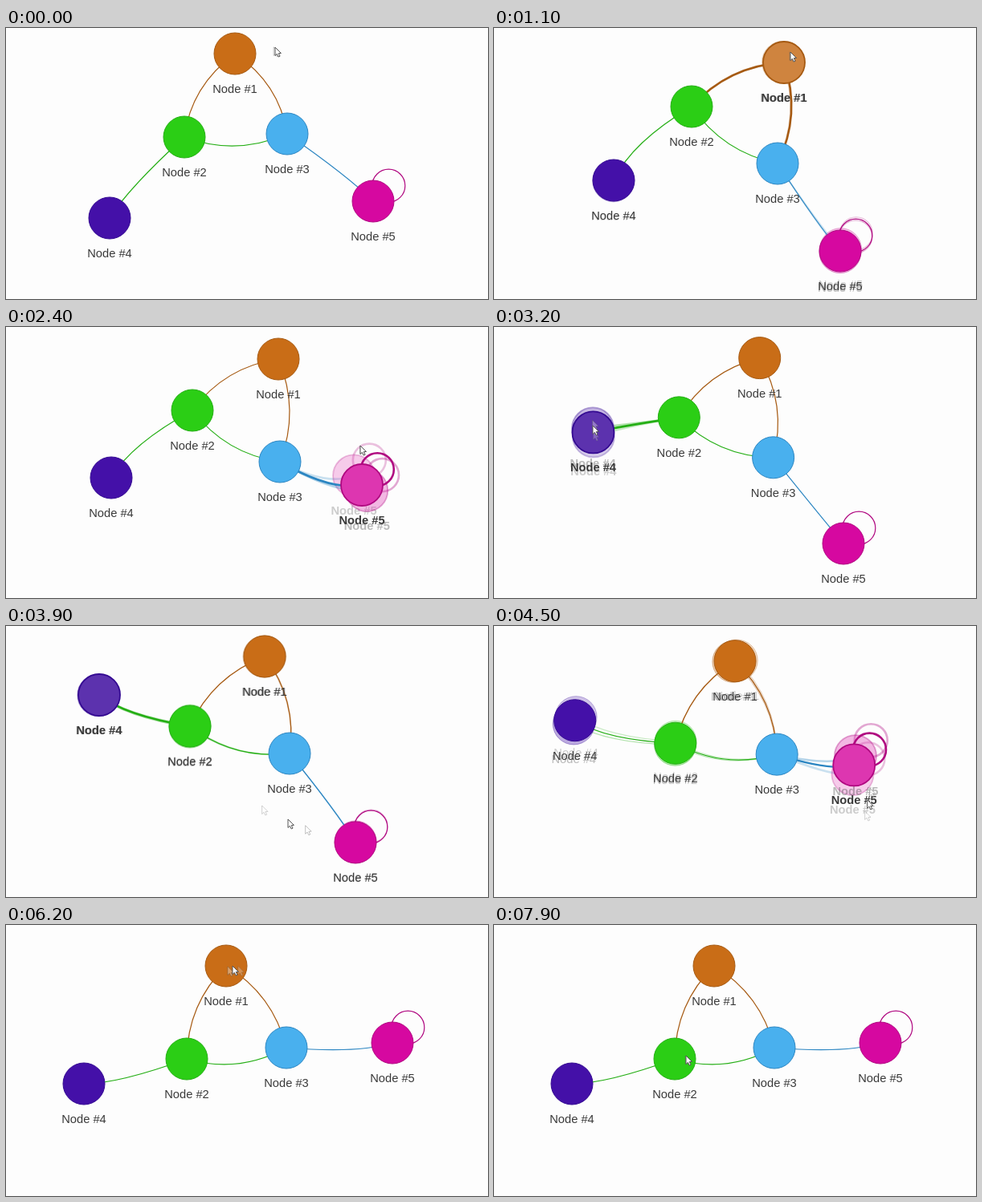
An HTML page with a canvas for the animation above (8000 ms loop, 600x338 px).

```html
<!DOCTYPE html>
<html lang="en">
<head>
<meta charset="utf-8">
<title>Elastic node graph</title>
<style>
  html, body { margin: 0; width: 100%; height: 100%; overflow: hidden; background: #fdfdfd; }
  canvas { display: block; }
</style>
</head>
<body>
<canvas id="stage" width="600" height="338"></canvas>
<script>
const ctx = document.getElementById('stage').getContext('2d');
const LOOP = 8000, STEP = 100, BLUR = 50;
const RADIUS = 26, BOW = 26;

// Each node glides through these poses: start, after each drag, and at rest
const poseTimes = [400, 1100, 2400, 3900, 5000, 5900];
const timed = poses => poses.map((p, i) => [poseTimes[i], ...p]);

const nodes = [
  { fill: '#c96d17', lit: '#cf843f', rim: '#a65a12',
    path: timed([[285, 32], [361, 43], [339, 40], [322, 38], [283, 49], [274, 51]]) },
  { fill: '#2bce15', lit: '#55d844', rim: '#24ae14',
    path: timed([[222, 136], [246, 98], [232, 104], [229, 125], [224, 161], [225, 167]]) },
  { fill: '#49b0ee', lit: '#6dc0f1', rim: '#2c86c2',
    path: timed([[350, 132], [353, 169], [341, 168], [353, 159], [351, 161], [349, 153]]) },
  { fill: '#4410a8', lit: '#5c32ae', rim: '#340a92',
    path: timed([[129, 237], [149, 190], [131, 188], [116, 86], [92, 156], [97, 198]]) },
  { fill: '#d608a0', lit: '#dd36b0', rim: '#b00880',
    path: timed([[457, 216], [431, 278], [443, 197], [435, 270], [464, 100], [481, 147]]) }
];
// The last node is also shaken up and down around its first drag
nodes[4].path.push([1700, 430, 291], [1850, 453, 285], [2250, 415, 165], [2600, 461, 220], [3200, 435, 270]);
nodes[4].path.sort((a, b) => a[0] - b[0]);

const cursorPath = [[0, 335, 24], [400, 293, 20], [1100, 369, 30], [1300, 369, 30], [1700, 436, 283],
  [2250, 441, 148], [2450, 441, 148], [2700, 131, 172], [3600, 121, 88], [3900, 351, 241],
  [4200, 444, 270], [5000, 480, 102], [5200, 480, 102], [6200, 282, 51], [7200, 196, 164], [7900, 239, 163]];

const edges = [[0, 1], [0, 2], [1, 2], [1, 3], [2, 4]];

// [start, selected node]
const selections = [[0, -1], [400, 0], [1700, 4], [2700, 3], [4200, 4], [5700, -1]];
const selectedAt = t => selections.filter(s => s[0] <= t).pop()[1];

// Monotone cubic interpolation of column k
function sample(path, t, k) {
  const last = path.length - 1;
  if (t <= path[0][0]) return path[0][k];
  if (t >= path[last][0]) return path[last][k];
  const i = path.findIndex(p => p[0] > t) - 1;
  const rate = j => (path[j + 1][k] - path[j][k]) / (path[j + 1][0] - path[j][0]);
  const slope = j => {
    if (j === 0 || j === last) return 0;
    const a = rate(j - 1), b = rate(j);
    return a * b <= 0 ? 0 : 2 * a * b / (a + b);
  };
  const h = path[i + 1][0] - path[i][0], u = (t - path[i][0]) / h, v = 1 - u;
  return path[i][k] * v * v * (1 + 2 * u) + path[i + 1][k] * u * u * (1 + 2 * v)
    + h * u * v * (slope(i) * v - slope(i + 1) * u);
}
const place = (path, t) => ({ x: sample(path, t, 1), y: sample(path, t, 2) });
const middle = (...ps) => ({
  x: ps.reduce((sum, p) => sum + p.x, 0) / ps.length,
  y: ps.reduce((sum, p) => sum + p.y, 0) / ps.length
});

function strokeLine(color, lit) {
  ctx.lineWidth = lit ? 2.6 : 1.2;
  ctx.strokeStyle = color;
  ctx.stroke();
}

// Edges bow away from the centre of the triangle; the tails follow their inner node
function drawEdge([from, to], spots, lit) {
  const a = spots[from], b = spots[to];
  const mid = middle(a, b), core = middle(...spots.slice(0, 3));
  const pushed = to > 2 ? a : mid;
  const dx = pushed.x - core.x, dy = pushed.y - core.y;
  const k = BOW / Math.hypot(dx, dy);
  ctx.beginPath();
  ctx.moveTo(a.x, a.y);
  ctx.quadraticCurveTo(mid.x + dx * k, mid.y + dy * k, b.x, b.y);
  strokeLine(nodes[from].rim, lit);
}

function drawLoop(p, lit) {
  ctx.beginPath();
  ctx.arc(p.x + 19.3, p.y - 19.3, 20.5, 0, 2 * Math.PI);
  strokeLine(nodes[4].rim, lit);
}

function drawNode(i, p, lit) {
  const n = nodes[i];
  ctx.beginPath();
  ctx.arc(p.x, p.y, RADIUS, 0, 2 * Math.PI);
  ctx.fillStyle = lit ? n.lit : n.fill;
  ctx.fill();
  ctx.lineWidth = lit ? 1.8 : 1;
  ctx.strokeStyle = n.rim;
  ctx.stroke();
  ctx.font = (lit ? 'bold ' : '') + '14.7px "Liberation Sans", Arial, sans-serif';
  ctx.textAlign = 'center';
  ctx.fillStyle = '#3a3a3a';
  ctx.fillText('Node #' + (i + 1), p.x, p.y + 49);
}

function drawCursor(p) {
  const shape = [[0, 0], [0, 10.5], [2.4, 8.3], [4.2, 12], [6, 11.2], [4.3, 7.6], [7.4, 7.4]];
  ctx.beginPath();
  for (const [x, y] of shape) ctx.lineTo(p.x + x, p.y + y);
  ctx.closePath();
  ctx.fillStyle = '#fff';
  ctx.fill();
  ctx.lineWidth = 1;
  ctx.strokeStyle = '#555';
  ctx.stroke();
}

// Draws the graph at time t; as a ghost of time `now`, only the parts that moved
function drawGraph(t, now) {
  const ghost = t !== now, chosen = selectedAt(now);
  const spots = nodes.map(n => place(n.path, t));
  const shown = spots.map((p, i) => {
    const q = place(nodes[i].path, now);
    return !ghost || Math.hypot(q.x - p.x, q.y - p.y) > 0.8;
  });
  for (const e of edges) {
    if (e.some(i => shown[i])) drawEdge(e, spots, e.includes(chosen));
  }
  if (shown[4]) drawLoop(spots[4], chosen === 4);
  spots.forEach((p, i) => { if (shown[i]) drawNode(i, p, chosen === i); });
}

// Blends in faint ghosts just before and after the moment
function blended(t, draw) {
  for (const [time, alpha] of [[t - BLUR, 0.25], [t + BLUR, 0.35], [t, 1]]) {
    ctx.globalAlpha = alpha;
    draw(time);
  }
}

function render(t) {
  ctx.fillStyle = '#fdfdfd';
  ctx.fillRect(0, 0, 600, 338);
  blended(t, time => drawGraph(time, t));
  blended(t, time => drawCursor(place(cursorPath, time)));
}

const start = performance.now();
function tick() {
  const t = (performance.now() - start) % LOOP;
  render(Math.floor(t / STEP) * STEP);
  requestAnimationFrame(tick);
}
tick();
</script>
</body>
</html>
```
